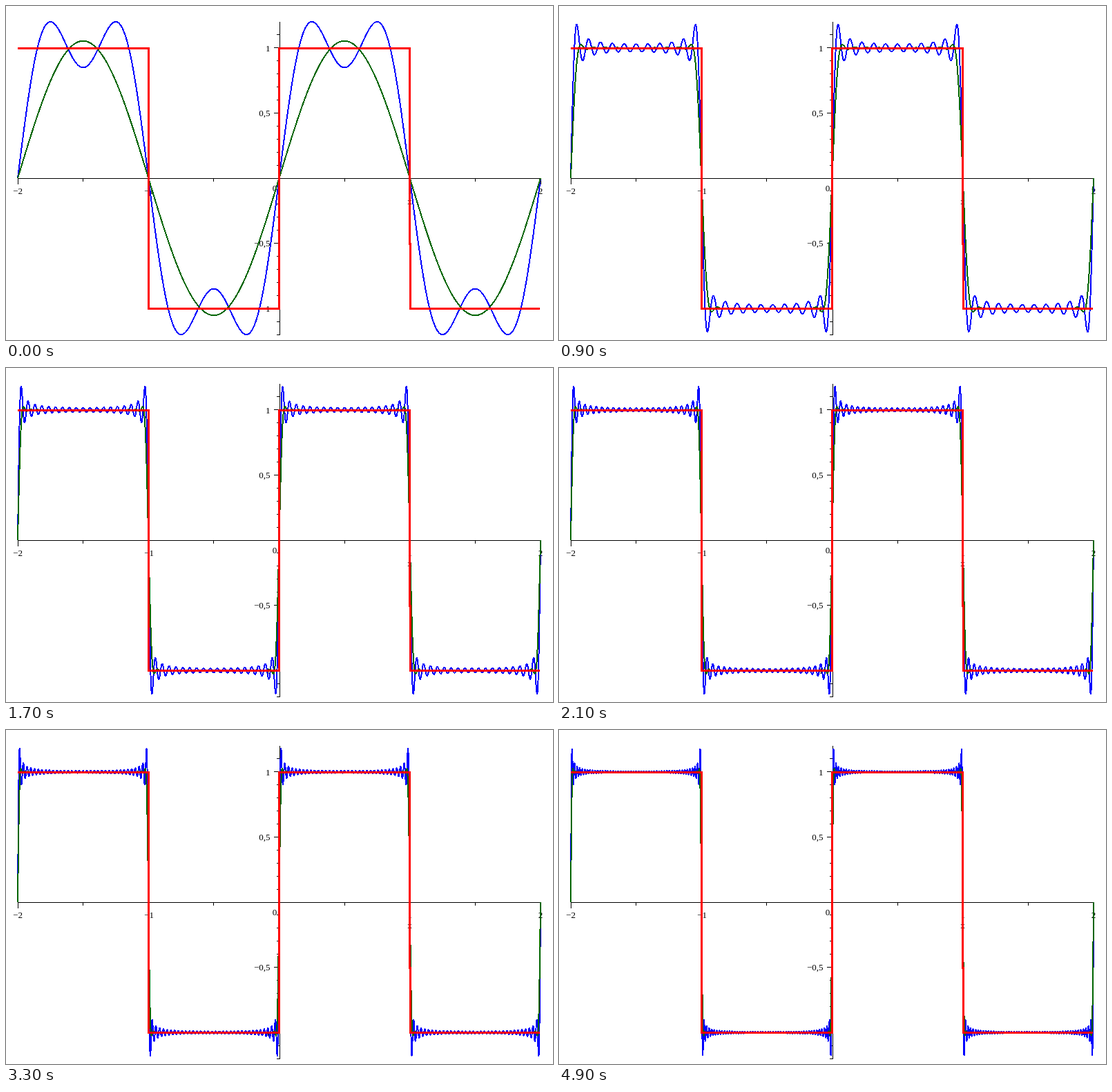
An HTML page that plays this animation: 792 px wide and 485 px high, repeating every 5 s.

```html
<!DOCTYPE html>
<html lang="en">
<head>
<meta charset="utf-8">
<title>Square wave: Fourier sums and sigma approximation</title>
<style>
  html, body { margin: 0; width: 100%; height: 100%; overflow: hidden; background: #fff; }
  svg { display: block; width: 792px; height: 485px; }
  path { fill: none; shape-rendering: crispEdges; }
  text { font: 13px "Liberation Serif", "Times New Roman", serif; fill: #000; }
  .mid { text-anchor: middle; }
  .end { text-anchor: end; }
  .curve { stroke-width: 2; stroke-linejoin: round; }
</style>
</head>
<body>
<svg viewBox="0 0 792 485">
  <path id="axes" stroke="#000"/>
  <g id="labels"></g>
  <path id="sum" class="curve" stroke="#0000ff"/>
  <path id="smooth" class="curve" stroke="#006400"/>
  <path stroke="#ff0000" stroke-width="3"
    d="M17 61.5H206.5V439.5H395.5V61.5H584.5V345H585.5V439.5H773"/>
</svg>
<script>
const STEP = 100, STEPS = 50, UNIT = 189.2;
const X0 = 395.5, Y0 = 250;
const $ = id => document.getElementById(id);
const px = x => X0 + 189.25 * x;
const py = y => Y0 - UNIT * y;

function drawAxes() {
  let d = "M17 250.5H775M396.5 23V478";
  for (let i = -4; i <= 4; i++) {
    if (i) d += `M${Math.floor(px(i / 2)) + 0.5} 250v${i % 2 ? 5 : 9}`;
  }
  for (let i = -12; i <= 11; i++) {
    const len = i % 5 ? 4 : 8;
    if (i) d += `M397 ${Math.floor(py(i / 10)) + 0.5}h${-len - 1}`;
  }
  $("axes").setAttribute("d", d);
}

function label(text, x, y, cls) {
  const t = document.createElementNS("http://www.w3.org/2000/svg", "text");
  t.setAttribute("x", x);
  t.setAttribute("y", y);
  t.setAttribute("class", cls);
  t.textContent = text;
  $("labels").append(t);
}

function drawLabels() {
  [["−2", 17], ["−1", 207], ["1", 585], ["2", 774]]
    .forEach(([s, x]) => label(s, x, 273, "mid"));
  [["1", 66], ["0,5", 160], ["−0,5", 349], ["−1", 444]]
    .forEach(([s, y]) => label(s, 382.5, y, "end"));
  label("0", 389, 269, "mid");
  label("x", 584.5, 288, "mid");
}

// Odd sine series with one weight per harmonic
function seriesPath(weights) {
  const pts = [];
  for (let p = 0; p <= 757; p += 0.25) {
    const x = p / 189.25 - 2;
    let y = 0;
    weights.forEach((w, i) => { y += w * Math.sin((2 * i + 1) * Math.PI * x); });
    pts.push((17 + p).toFixed(2) + " " + py(y).toFixed(2));
  }
  return "M" + pts.join("L");
}

function drawCurves(terms) {
  const last = 2 * terms - 1;
  const plain = [], damped = [];
  for (let k = 1; k <= last; k += 2) {
    const w = 4 / (Math.PI * k), a = Math.PI * k / last;
    plain.push(w);
    damped.push(w * Math.sin(a) / a);
  }
  $("sum").setAttribute("d", seriesPath(plain));
  $("smooth").setAttribute("d", seriesPath(damped));
}

drawAxes();
drawLabels();
drawCurves(2);

const start = performance.now();
let shown = 0;
function tick() {
  const step = Math.floor((performance.now() - start) / STEP) % STEPS;
  if (step !== shown) {
    shown = step;
    drawCurves(step + 2);
  }
  requestAnimationFrame(tick);
}
requestAnimationFrame(tick);
</script>
</body>
</html>
```
